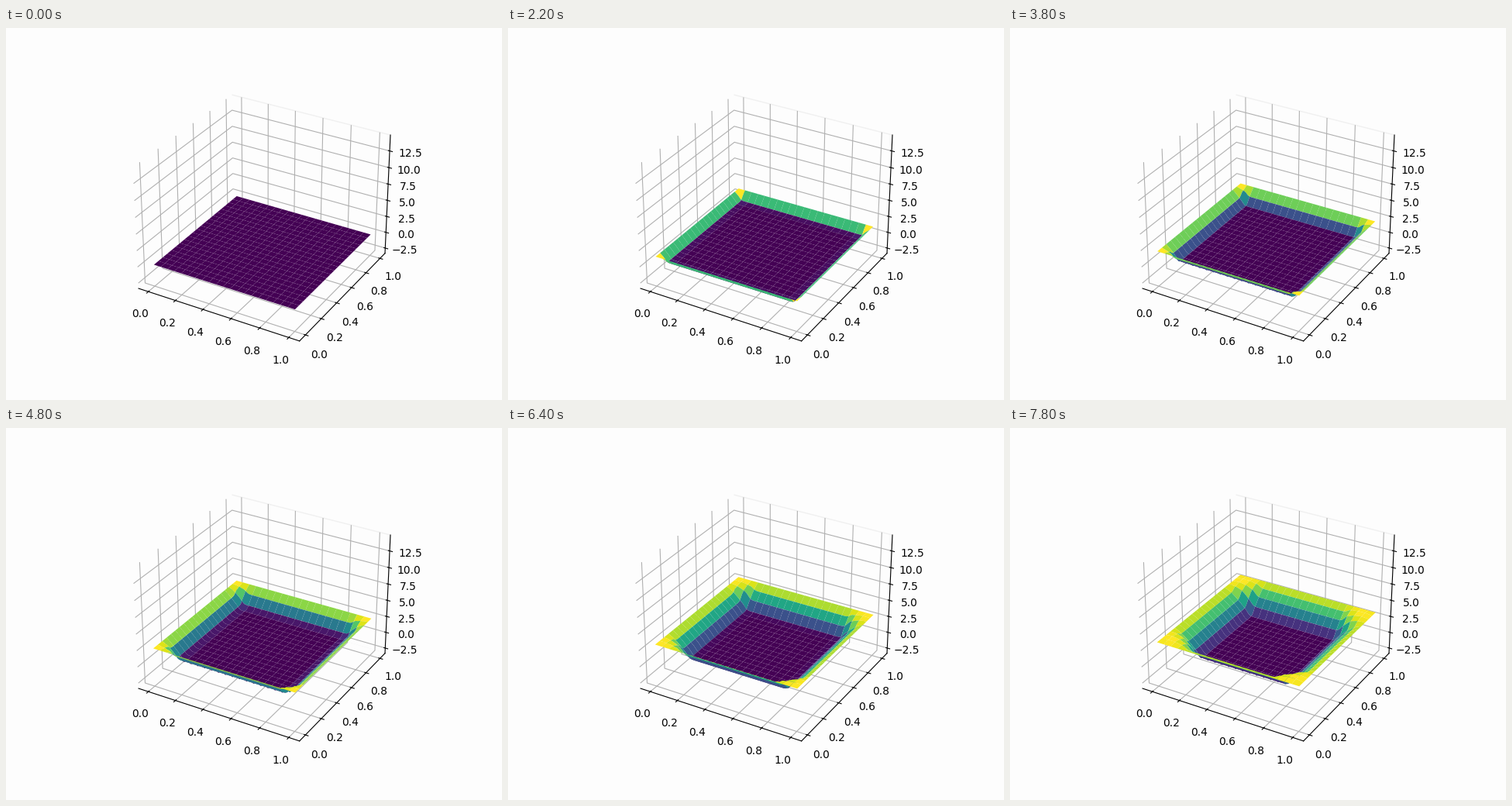
Write a matplotlib script that moves like this. It is 640 px wide and 480 px high and loops after 8000 ms.

```python
import numpy as np
import matplotlib.pyplot as plt
from matplotlib.animation import FuncAnimation

FRAMES = 40
CELLS = 100
STRIDE = 5
DT = 0.005
COURANT = DT * CELLS      # wave speed 1, spacing 1 / CELLS
AMPLITUDE = 3.66
PAPER = "#fdfdfd"


def drive(u, step):
    """Raise and lower the whole rim of the membrane together."""
    rim = AMPLITUDE * np.sin(2 * np.pi * DT * step)
    u[0, :] = u[-1, :] = rim
    u[:, 0] = u[:, -1] = rim


def simulate():
    """Wave equation on the unit square, starting flat and at rest."""
    old = np.zeros((CELLS + 1, CELLS + 1))
    now = old.copy()
    states = [now]
    for step in range(1, FRAMES):
        new = 2 * now - old
        new[1:-1, 1:-1] += COURANT ** 2 * (
            now[2:, 1:-1] + now[:-2, 1:-1] + now[1:-1, 2:] + now[1:-1, :-2]
            - 4 * now[1:-1, 1:-1])
        drive(new, step)
        old, now = now, new
        states.append(now)
    return states


states = simulate()
grid = np.linspace(0, 1, CELLS + 1)
X, Y = np.meshgrid(grid, grid)

fig = plt.figure(figsize=(6.4, 4.8), dpi=100, facecolor=PAPER)
ax = fig.add_subplot(projection="3d", facecolor=PAPER)
pad = 0.05 + 1.1 / 48
ax.set_xlim(-pad, 1 + pad)
ax.set_ylim(-pad, 1 + pad)
ax.set_zlim(-3.34, 14.86)
for axis in (ax.xaxis, ax.yaxis, ax.zaxis):
    axis.set_pane_color(PAPER)
ax.yaxis.pane.set_edgecolor("#f0f0f0")

surface = None


def draw(i):
    global surface
    if surface is not None:
        surface.remove()
    surface = ax.plot_surface(X, Y, states[i], cmap="viridis",
                              rstride=STRIDE, cstride=STRIDE)
    return [surface]


anim = FuncAnimation(fig, draw, frames=FRAMES, init_func=lambda: draw(0),
                     interval=200, repeat=True, repeat_delay=0, blit=False)
plt.show()
```
